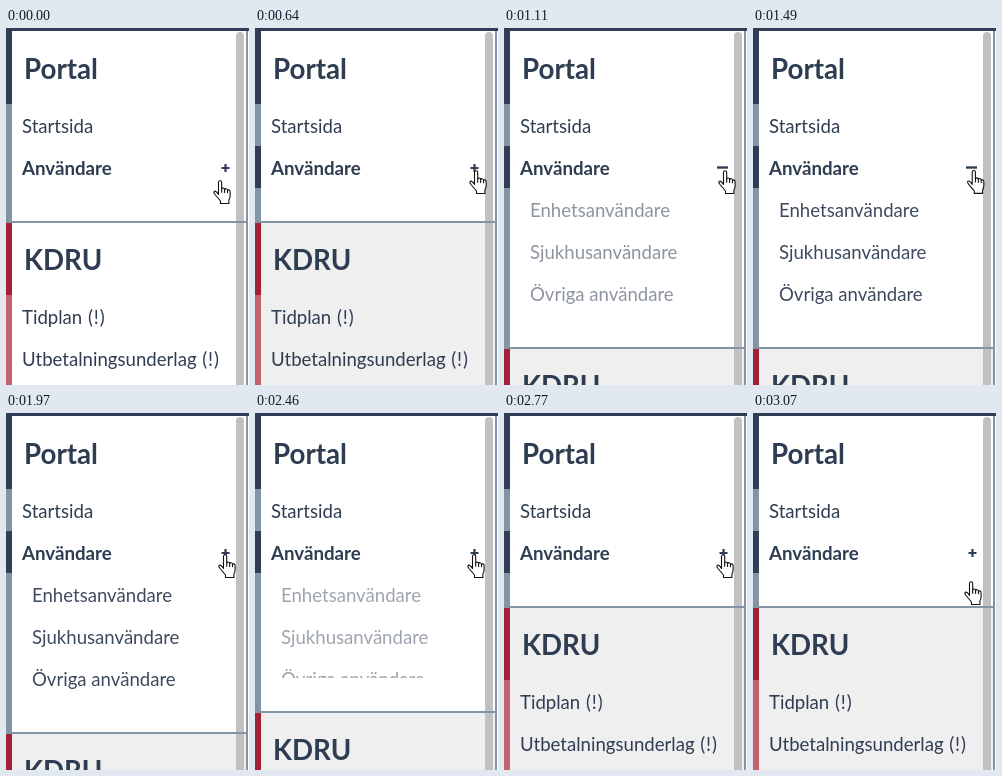
Write an HTML page that moves like this. It is 243 px wide and 357 px high and loops after 3.14 s.

```html
<!DOCTYPE html>
<html lang="sv">
<head>
<meta charset="utf-8">
<title>Meny</title>
<style>
  html, body { margin: 0; width: 100%; height: 100%; overflow: hidden; background: #fff; }
  svg { display: block; position: absolute; left: 0; top: 0; }
  text { font: 400 18.6px Lato, Carlito, sans-serif; fill: #2f3d52; }
  .bold { font-weight: 700; font-size: 18.7px; }
  .head { font-weight: 700; font-size: 27.7px; }
  .note { letter-spacing: .9px; }
  .navy { fill: #2f3e56; }
  .slate { fill: #8394a4; }
</style>
</head>
<body>
<svg width="243" height="357" viewBox="0 0 243 357">
  <defs>
    <clipPath id="fold"><rect id="foldBox" x="6" y="160" width="224" height="0"/></clipPath>
  </defs>
  <rect width="243" height="357" fill="#fff"/>
  <rect class="slate" y="76" width="6" height="281"/>
  <rect class="navy" y="3" width="6" height="73"/>
  <rect class="navy" id="mark" y="118" width="6" height="42"/>
  <text class="head" x="18" y="51">Portal</text>
  <text x="16" y="104.5">Startsida</text>
  <text class="bold" x="16" y="146.5">Användare</text>
  <g clip-path="url(#fold)">
    <g id="subs">
      <text x="26" y="188.5">Enhetsanvändare</text>
      <text x="26" y="230.5">Sjukhusanvändare</text>
      <text x="26" y="272.5">Övriga användare</text>
    </g>
  </g>
  <path id="plus" d="M215.5 140h8M219.5 136v8" stroke="#2f3d52" stroke-width="2.2"/>
  <path id="minus" d="M213 139.5h11" stroke="#2f3d52" stroke-width="2.4"/>
  <g id="lower">
    <rect id="panel" x="6" y="195" width="234" height="170"/>
    <rect y="195" width="6" height="72" fill="#a32136"/>
    <rect y="267" width="6" height="100" fill="#c4616f"/>
    <text class="head" x="18" y="242">KDRU</text>
    <text x="16" y="295.5">Tidplan<tspan class="note"> (!)</tspan></text>
    <text x="16" y="337.5">Utbetalningsunderlag<tspan class="note"> (!)</tspan></text>
  </g>
  <rect class="slate" x="240" y="3" width="2" height="354"/>
  <rect x="230" y="4" width="8" height="370" rx="4" fill="#c1c1c1"/>
  <rect class="slate" id="rule" x="6" y="193" width="234" height="2"/>
  <rect class="navy" width="243" height="3"/>
  <g id="hand" stroke="#111" stroke-width="1.1" stroke-linejoin="round" stroke-linecap="round">
    <path fill="#fff" d="M5.5 14.5V2.3a1.6 1.6 0 0 1 3.2 0V9q0-1 1.4-1 1.5 0 1.5 1.5.3-1 1.5-.8 1.4.2 1.4 1.6.4-.6 1.3-.4 1.3.3 1.3 1.8V16q0 2-1.2 4v3.5H7.5V21L2 14.5Q0 12 1.5 11.2 3 10.5 5.5 14.5z"/>
    <path fill="none" d="M8.7 9v3.2M11.6 9.5v3M14.5 10.3v2.4"/>
  </g>
</svg>
<script>
  const LOOP = 3140, TICK = 76.6, FULL = 126, SLIDE = 302;
  const CLOSE = 1970, LEAVE = 3070, OPEN = 780;
  const $ = id => document.getElementById(id);
  const set = (id, name, value) => $(id).setAttribute(name, value);
  const show = (id, on) => set(id, 'visibility', on ? 'visible' : 'hidden');

  // Progress from 0 to 1
  const ramp = (t, start, span) => Math.min(1, Math.max(0, (t - start) / span));
  const swing = (t, start, span) => .5 - .5 * Math.cos(Math.PI * ramp(t, start, span));

  function handAt(t, now) {
    if (t >= LEAVE) return [211, 168];
    const enter = Math.sin(Math.PI / 2 * ramp(now, 0, 230));
    const drift = ramp(now, 1430, 180);
    return [207 + 7 * enter - 2 * drift, 152 - 10 * enter - drift];
  }

  function draw(t) {
    const now = Math.floor(t / TICK) * TICK;
    const height = Math.round(FULL * (swing(now, 765, SLIDE) - swing(now, 2370, SLIDE)));
    const fade = .93 * (swing(now, 850, 400) - swing(now, 2190, 520));
    const over = ramp(now, 0, 230);
    const grey = 255 - Math.round(16 * over);
    const expanded = t >= OPEN && t < CLOSE;

    set('foldBox', 'height', height);
    set('lower', 'transform', `translate(0 ${height})`);
    set('rule', 'transform', `translate(0 ${height})`);
    set('subs', 'opacity', fade);
    set('mark', 'opacity', over);
    set('panel', 'fill', `rgb(${grey},${grey},${grey})`);
    set('hand', 'transform', `translate(${handAt(t, now)})`);
    show('plus', !expanded);
    show('minus', expanded);
  }

  const begin = performance.now();
  function loop() {
    draw((performance.now() - begin) % LOOP);
    requestAnimationFrame(loop);
  }
  loop();
</script>
</body>
</html>
```
